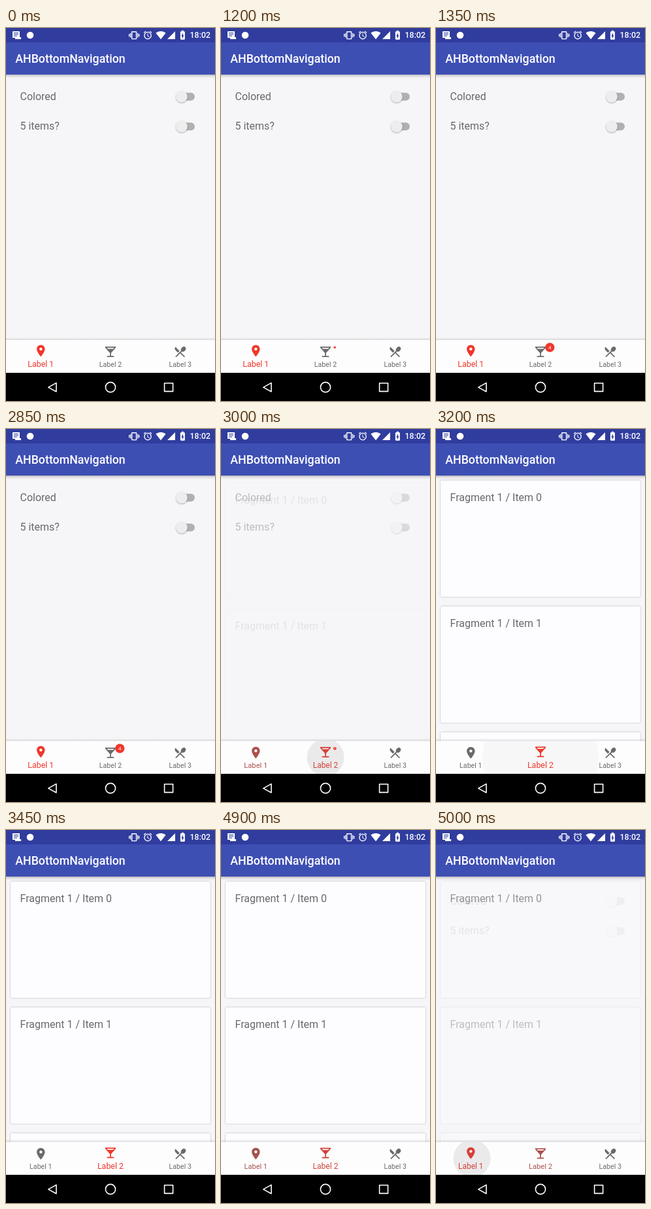
An HTML page that plays this animation: 320 px wide and 569 px high, repeating every 5050 ms.

```html
<!DOCTYPE html>
<html lang="en">
<head>
<meta charset="utf-8">
<title>Bottom navigation</title>
<style>
  html, body { margin: 0; width: 100%; height: 100%; overflow: hidden; background: #000; }
  svg { display: block; width: 100%; height: 100%; }
  text { font-family: Roboto, sans-serif; }
  .body { font-size: 16px; fill: #69686b; }
  .label { font-size: 10.67px; text-anchor: middle; }
  .card { fill: #fdfcfe; filter: drop-shadow(0 .8px .8px rgba(0,0,0,.3)); }
  .thumb { fill: #eeedee; filter: drop-shadow(0 1px 1px rgba(0,0,0,.3)); }
  .keys { fill: none; stroke: #fff; stroke-width: 1.6; stroke-linejoin: round; }
</style>
</head>
<body>
<svg viewBox="0 0 320 569">
  <defs>
    <linearGradient id="under" x2="0" y2="1">
      <stop stop-color="#000" stop-opacity=".26"/>
      <stop offset=".4" stop-color="#000" stop-opacity=".09"/>
      <stop offset="1" stop-color="#000" stop-opacity="0"/>
    </linearGradient>
    <linearGradient id="over" x2="0" y2="1">
      <stop stop-color="#000" stop-opacity="0"/>
      <stop offset="1" stop-color="#000" stop-opacity=".12"/>
    </linearGradient>
    <clipPath id="bar"><rect y="476" width="320" height="50"/></clipPath>
    <g id="switch">
      <rect x="263" y="-6" width="26" height="12" rx="6" fill="#b1afb2"/>
      <circle class="thumb" cx="269" r="8.8"/>
    </g>
  </defs>

  <rect width="320" height="569" fill="#f6f5f8"/>

  <g id="list">
    <rect class="card" x="7" y="78.5" width="306" height="177.5" rx="2"/>
    <rect class="card" x="7" y="270.5" width="306" height="177.5" rx="2"/>
    <rect class="card" x="7" y="462.5" width="306" height="177.5" rx="2"/>
    <text class="body" x="21.5" y="302">Fragment 1 / Item 1</text>
  </g>
  <text class="body" id="first" x="21.5" y="110">Fragment 1 / Item 0</text>

  <g id="home">
    <text class="body" x="21.5" y="110">Colored</text>
    <text class="body" x="21.5" y="155.3">5 items?</text>
    <use href="#switch" y="104.7"/>
    <use href="#switch" y="150.2"/>
  </g>

  <rect y="71" width="320" height="6" fill="url(#under)"/>
  <rect width="320" height="71" fill="#3e4fb4"/>
  <rect width="320" height="22" fill="#303d9e"/>
  <text x="14.2" y="53.2" font-size="17.78" font-weight="500" fill="#fff">AHBottomNavigation</text>

  <g fill="#fff">
    <path d="M10 5h11v9h2v3h-9v-2h-4z"/>
    <path d="M12 7.5h7M12 9.8h7M12 12.1h5" stroke="#303d9e"/>
    <circle cx="37" cy="11" r="5.3"/>
    <path transform="translate(188 3) scale(.68)" d="M0 15h2V9H0v6zm3 2h2V7H3v10zm19-8v6h2V9h-2zm-3 8h2V7h-2v10zM16.5 3h-9C6.67 3 6 3.67 6 4.5v15c0 .83.67 1.5 1.5 1.5h9c.83 0 1.5-.67 1.5-1.5v-15c0-.83-.67-1.5-1.5-1.5zM16 19H8V5h8v14z"/>
    <path transform="translate(209.4 3.2) scale(.64)" d="M22 5.72l-4.6-3.86-1.29 1.53 4.6 3.86L22 5.72zM7.88 3.39L6.6 1.86 2 5.71l1.29 1.53 4.59-3.85zM12.5 8H11v6l4.75 2.85.75-1.23-4-2.37V8zM12 4c-4.97 0-9 4.03-9 9s4.02 9 9 9 9-4.03 9-9-4.03-9-9-9zm0 16c-3.87 0-7-3.13-7-7s3.13-7 7-7 7 3.13 7 7-3.13 7-7 7z"/>
    <path transform="translate(229.1 3) scale(.66)" d="M12 21.5L23.64 7C23.2 6.66 18.7 3 12 3S.8 6.66.36 7z"/>
    <path d="M247 17h12V5z"/>
    <path transform="translate(262 2.4) scale(.7)" d="M15.67 4H14V2h-4v2H8.33C7.6 4 7 4.6 7 5.33v15.33C7 21.4 7.6 22 8.33 22h7.33c.74 0 1.34-.6 1.34-1.33V5.33C17 4.6 16.4 4 15.67 4zM11 20v-5.5H9L13 7v5.5h2L11 20z"/>
    <text x="281.5" y="15.4" font-size="12.44" font-weight="500">18:02</text>
  </g>

  <rect y="472" width="320" height="4" fill="url(#over)"/>
  <rect y="476" width="320" height="50" fill="#fefdfe"/>
  <g clip-path="url(#bar)"><circle id="ripple" cy="501"/></g>

  <g class="tab">
    <path d="M12 2C8.13 2 5 5.13 5 9c0 5.25 7 13 7 13s7-7.75 7-13c0-3.87-3.13-7-7-7zm0 9.5c-1.38 0-2.5-1.12-2.5-2.5s1.12-2.5 2.5-2.5 2.5 1.12 2.5 2.5-1.12 2.5-2.5 2.5z"/>
    <text class="label" x="53.3" y="517">Label 1</text>
  </g>
  <g class="tab">
    <path d="M21 5V3H3v2l8 9v5H6v2h12v-2h-5v-5l8-9zM7.43 7L5.66 5h12.69l-1.78 2H7.43z"/>
    <text class="label" x="160" y="517">Label 2</text>
  </g>
  <g class="tab">
    <path d="M8.1 13.34l2.83-2.83L3.91 3.5c-1.56 1.56-1.56 4.09 0 5.66l4.19 4.18zm6.78-1.81c1.53.71 3.68.21 5.27-1.38 1.91-1.91 2.28-4.65.81-6.12-1.46-1.46-4.2-1.1-6.12.81-1.59 1.59-2.09 3.74-1.38 5.27L3.7 19.87l1.41 1.41L12 14.41l6.88 6.88 1.41-1.41L13.41 13l1.47-1.47z"/>
    <text class="label" x="266.7" y="517">Label 3</text>
  </g>

  <g id="badge">
    <circle r="7.1" fill="#f0372b"/>
    <text y="2.9" font-size="8" text-anchor="middle" fill="#fff">4</text>
  </g>

  <rect y="526" width="320" height="43"/>
  <g class="keys">
    <path d="M77 541.4v13.4l-12.2-6.7z"/>
    <circle cx="160" cy="548" r="7.6"/>
    <rect x="242.6" y="541.8" width="13" height="12.6"/>
  </g>
</svg>

<script>
const LOOP = 5050, STEP = 50, BADGE = 1200, OPEN = 2900, BACK = 4900;
const GREY = [106, 106, 108], RED = [240, 55, 43];

// One value per step after a tap; the last one holds.
const GAIN = [.45, .65, .8, .95, 1];
const LOSS = [.25, .38, .5, .8, 1];
const GROW = [.18, .45, .7, .92, 1];
const FADE_OUT = [1, .75, .4, .12, 0];
const FADE_IN = [0, 0, .13, .55, .84, .94, 1];
const SHIFT = [5, 5, 4, 2, 1, .5, 0];

const $ = id => document.getElementById(id);
const list = $('list'), first = $('first'), home = $('home');
const ripple = $('ripple'), badge = $('badge');
const tabs = [...document.querySelectorAll('.tab')];

const at = (values, s) => values[Math.min(values.length - 1, s / STEP)];
const clamp = v => Math.max(0, Math.min(1, v));
const mix = (a, b, p) => a + (b - a) * p;

function paintTab(i, tint, size) {
  const [icon, label] = tabs[i].children;
  const x = 53.33 + i * 106.67 - 10.67;
  const y = mix(494, 492.5, size) - 10.67;
  icon.setAttribute('transform', `translate(${x} ${y}) scale(.889)`);
  label.style.fontSize = mix(10.67, 12.44, size) + 'px';
  tabs[i].setAttribute('fill', `rgb(${GREY.map((c, k) => mix(c, RED[k], tint))})`);
}

function place(el, opacity, dy) {
  el.setAttribute('opacity', opacity);
  el.setAttribute('transform', `translate(0 ${dy})`);
}

function render(time) {
  const t = Math.floor(time % LOOP / STEP) * STEP;
  const back = t >= BACK, tapped = t >= OPEN;
  const s = t - (back ? BACK : OPEN);

  let to = 0, tints = [1, 0], sizes = [1, 0];
  let enter = 1, leave = 0, dy = 0;
  if (tapped) {
    to = back ? 0 : 1;
    tints[to] = at(GAIN, s);
    tints[1 - to] = 1 - at(LOSS, s);
    sizes[to] = at(GROW, s);
    sizes[1 - to] = 1 - sizes[to];
    enter = at(FADE_IN, s);
    leave = at(FADE_OUT, s);
    dy = at(SHIFT, s);
  }
  paintTab(0, tints[0], sizes[0]);
  paintTab(1, tints[1], sizes[1]);
  paintTab(2, 0, 0);

  const homeIn = to === 0;
  place(home, homeIn ? enter : leave, homeIn ? dy : 0);
  place(list, homeIn ? leave : enter, homeIn ? 0 : dy);
  place(first, homeIn ? leave ** .4 : enter, homeIn ? 0 : dy);

  ripple.setAttribute('cx', back ? 55 : 160);
  ripple.setAttribute('r', tapped ? Math.min(s * .28 + s * s / 2e4, 90) : 0);
  ripple.setAttribute('opacity', .075 * clamp(1 - (s - 100) / 300));

  const shown = tapped ? (back ? 0 : clamp(1 - s / 150)) : clamp((t - BADGE + STEP) / 200);
  badge.setAttribute('transform', `translate(174.3 487.3) scale(${shown})`);
}

const start = performance.now();
(function tick() {
  render(performance.now() - start);
  requestAnimationFrame(tick);
})();
</script>
</body>
</html>
```
